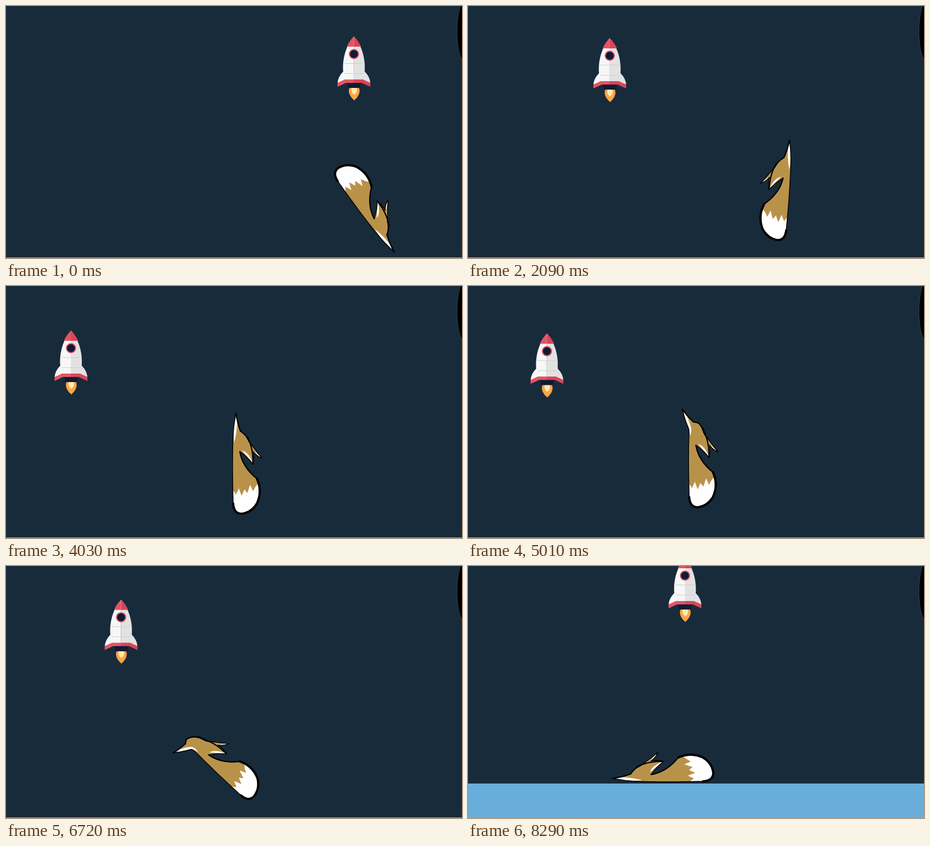
Write an HTML page with a canvas that moves like this. It is 807 by 446 pixels and loops after 8.39 s.

```html
<!DOCTYPE html>
<html>
<head>
<meta charset="utf-8">
<style>
html, body { margin: 0; width: 100%; height: 100%; overflow: hidden; background: #182b3b; }
canvas { display: block; }
</style>
</head>
<body>
<canvas id="stage" width="807" height="446"></canvas>
<script>
const ctx = document.getElementById('stage').getContext('2d');
const W = 807, H = 446, LOOP = 8390, LAST = 8290;

// Waypoints: time, rocket x and y, fox x and y
const PATH = [
  [0, 587, 54, 645, 354],
  [1160, 314, 48, 558, 361],
  [2090, 222, 57, 548, 326],
  [3400, 66, 73, 455, 318],
  [4030, 86, 79, 422, 315],
  [6010, 140, 87, 401.5, 295],
  [7410, 225, 19, 358, 390],
  [LAST, 355, -14, 346, 361]
];

const clamp = x => Math.min(1, Math.max(0, x));
const ramp = (a, b, x) => {
  const k = clamp((x - a) / (b - a));
  return k * k * (3 - 2 * k);
};
const bump = (mid, width, t) => ramp(width, 0, Math.abs(t - mid));

function slope(i, c) {
  const [a, b, d] = [PATH[i - 1], PATH[i], PATH[i + 1]];
  if (!a || !d) return null;
  const s = (b[c] - a[c]) / (b[0] - a[0]), r = (d[c] - b[c]) / (d[0] - b[0]);
  return s * r <= 0 ? 0 : 2 * s * r / (s + r);
}

// Monotone cubic through the waypoints
function along(c, t) {
  let i = 0;
  while (i < PATH.length - 2 && PATH[i + 1][0] < t) i++;
  const a = PATH[i], b = PATH[i + 1], h = b[0] - a[0];
  const k = (t - a[0]) / h, j = 1 - k, line = (b[c] - a[c]) / h;
  const m0 = slope(i, c) ?? line, m1 = slope(i + 1, c) ?? line;
  return a[c] * j * j * (1 + 2 * k) + b[c] * k * k * (3 - 2 * k) + h * k * j * (m0 * j - m1 * k);
}

function ball(color, x, y, rx, ry = rx) {
  ctx.fillStyle = color;
  ctx.beginPath();
  ctx.ellipse(x, y, rx, ry, 0, 0, 7);
  ctx.fill();
}

function shape(color, d) {
  ctx.fillStyle = color;
  ctx.fill(new Path2D(d));
}

function drawRocket(t) {
  ctx.save();
  ctx.translate(along(1, t), along(2, t));
  shape('#ffa443', 'M21 91H38Q42 102 29.5 113Q17 102 21 91Z');
  shape('#ffe9ad', 'M25 91H34Q36 99 29.5 103Q23 99 25 91Z');
  shape('#101a35', 'M17 81H41L40 91H19Z');
  for (const [flip, white, red] of [[1, '#f7f7f7', '#e65463'], [-1, '#e2e2e3', '#d94657']]) {
    ctx.save();
    ctx.translate(29, 0);
    ctx.scale(flip, 1);
    shape(white, 'M0 0C-12 13 -21 36 -19 62Q-28 71 -29 82L-15 78H0Z');
    shape(red, 'M0 0Q-9 9 -12.5 18H0Z');
    shape(red, 'M-29 82L-16 76H0V82H-14L-29 89Z');
    ctx.restore();
  }
  ctx.fillStyle = '#cfcfcf';
  for (const y of [47, 65]) ctx.fillRect(12, y, 34, 1);
  ball('#de4d5d', 29, 31, 9);
  ball('#101a35', 29, 31, 7);
  ctx.restore();
}

// Bent spine of the fox: 0 is the nose, 178 the end of the tail
function makeWarp(t) {
  const mirrored = t < 580 || (t > 1620 && t < 3060);
  const side = mirrored ? -1 : 1;
  const angle = 4.07 - 2.5 * ramp(0, 1160, t) + 0.07 * bump(2090, 900, t) - 1.57 * ramp(6010, 7410, t);
  const curl = bump(1160, 800, t), nod = bump(6010, 1400, t);
  const squash = Math.max(curl, bump(7410, 800, t));
  const turn = u => angle + side * (1.65 * curl * ramp(90, 122, u) - 2.28 * nod * ramp(46, 36, u));
  const scale = u => u < 46 ? 1 - 0.4 * nod : u < 90 ? 1 : u < 122 ? 1 - 0.7 * curl : 1 - 0.4 * squash;
  const spine = [];
  spine[90] = [
    along(3, t) - 22 * side * Math.sin(angle),
    along(4, t) + 22 * side * Math.cos(angle)
  ];
  const step = (u, dir) => {
    const m = u + dir / 2, k = scale(m) * dir, [x, y] = spine[u];
    spine[u + dir] = [x + k * Math.cos(turn(m)), y + k * Math.sin(turn(m))];
  };
  for (let u = 90; u < 180; u++) step(u, 1);
  for (let u = 90; u > 0; u--) step(u, -1);
  return (u, v) => {
    const i = Math.floor(clamp(u / 179) * 179), k = u - i;
    const p = spine[i], q = spine[i + 1], w = turn(u);
    return [
      p[0] + (q[0] - p[0]) * k + v * side * Math.sin(w),
      p[1] + (q[1] - p[1]) * k - v * side * Math.cos(w)
    ];
  };
}

// Parts are a start point, then lines [x, y] or curves [cx, cy, x, y]
const SNOUT = [[0, 7], [18, 10, 32, 15], [38, 25, 50, 30]];
const TAIL = [[138, 54, 160, 44], [176, 34, 178, 17], [178, 3, 160, 2]];
const RIM = [[116, 44], ...TAIL];
const NECK = [[68, 14], [95, 18, 116, 44]];
const BODY = [
  ...SNOUT, [66, 42, 80, 53], [76, 44, 68, 38], [80, 40, 90, 37], [78, 28, 68, 14],
  ...NECK.slice(1), ...TAIL, [90, 0, 40, 2], [20, 3, 0, 7]
];
const SPIKES = Array.from({ length: 9 }, (_, i) =>
  [137 - 1.2 * i + (i % 2 ? 11 : 0) + 3 * Math.sin(5 * i), 2 + 5 * i]);
const TIP = [[124, 47], ...TAIL, ...SPIKES];
const CHIN = [[3, 8], [24, 11, 52, 4], [28, 1, 3, 8]];
const EAR = [[89, 37], [78, 28, 66, 18], [70, 30, 89, 37]];
const BACK_EAR = [[79, 52], [76, 44, 67, 38], [72, 45, 79, 52]];
const BROW = [[42, 27], [62, 38, 90, 37]];

function trace(part, warp) {
  let [x, y] = part[0];
  ctx.beginPath();
  ctx.moveTo(...warp(x, y));
  for (const s of part.slice(1)) {
    const [ex, ey] = s.slice(-2);
    const [cx, cy] = s.length > 2 ? s : [(x + ex) / 2, (y + ey) / 2];
    for (let i = 1; i <= 14; i++) {
      const k = i / 14, j = 1 - k;
      ctx.lineTo(...warp(j * j * x + 2 * j * k * cx + k * k * ex, j * j * y + 2 * j * k * cy + k * k * ey));
    }
    [x, y] = [ex, ey];
  }
}

function drawFox(t) {
  const warp = makeWarp(t);
  const fill = (color, ...parts) => {
    ctx.fillStyle = color;
    for (const part of parts) {
      trace(part, warp);
      ctx.fill();
    }
  };
  const line = (width, ...parts) => {
    ctx.lineWidth = width;
    for (const part of parts) {
      trace(part, warp);
      ctx.stroke();
    }
  };
  ctx.strokeStyle = '#000';
  ctx.lineJoin = ctx.lineCap = 'round';
  fill('#b9924a', BODY);
  fill('#fff', TIP, CHIN, EAR, BACK_EAR);
  line(1.4, BODY);
  line(2.2, BROW, NECK, SNOUT);
  line(4, RIM);
}

function drawCursor(x, y) {
  ctx.save();
  ctx.translate(x, y);
  const arrow = new Path2D('M0 0V16L3.7 12.6L6.4 18.6L9 17.5L6.4 11.6H11.3Z');
  ctx.fillStyle = '#fff';
  ctx.strokeStyle = '#111';
  ctx.lineWidth = 1;
  ctx.fill(arrow);
  ctx.stroke(arrow);
  ctx.restore();
}

function draw() {
  const t = Math.min(performance.now() % LOOP, LAST);
  ctx.fillStyle = '#182b3b';
  ctx.fillRect(0, 0, W, H);
  ball('#39434b', 812.5, 45, 15, 54);
  ball('#000', 813, 45, 14.5, 54);
  drawRocket(t);
  ctx.fillStyle = '#8fb3cc';
  ctx.fillRect(0, 445, W, 1);
  const level = H - 61 * clamp((t - 6840) / 1450) ** 0.8;
  ctx.fillStyle = '#69aedb';
  ctx.fillRect(0, level, W, H - level);
  drawFox(t);
  if (t > 7000 && t < 7680) drawCursor(348.5, 417.5);
  requestAnimationFrame(draw);
}
draw();
</script>
</body>
</html>
```
